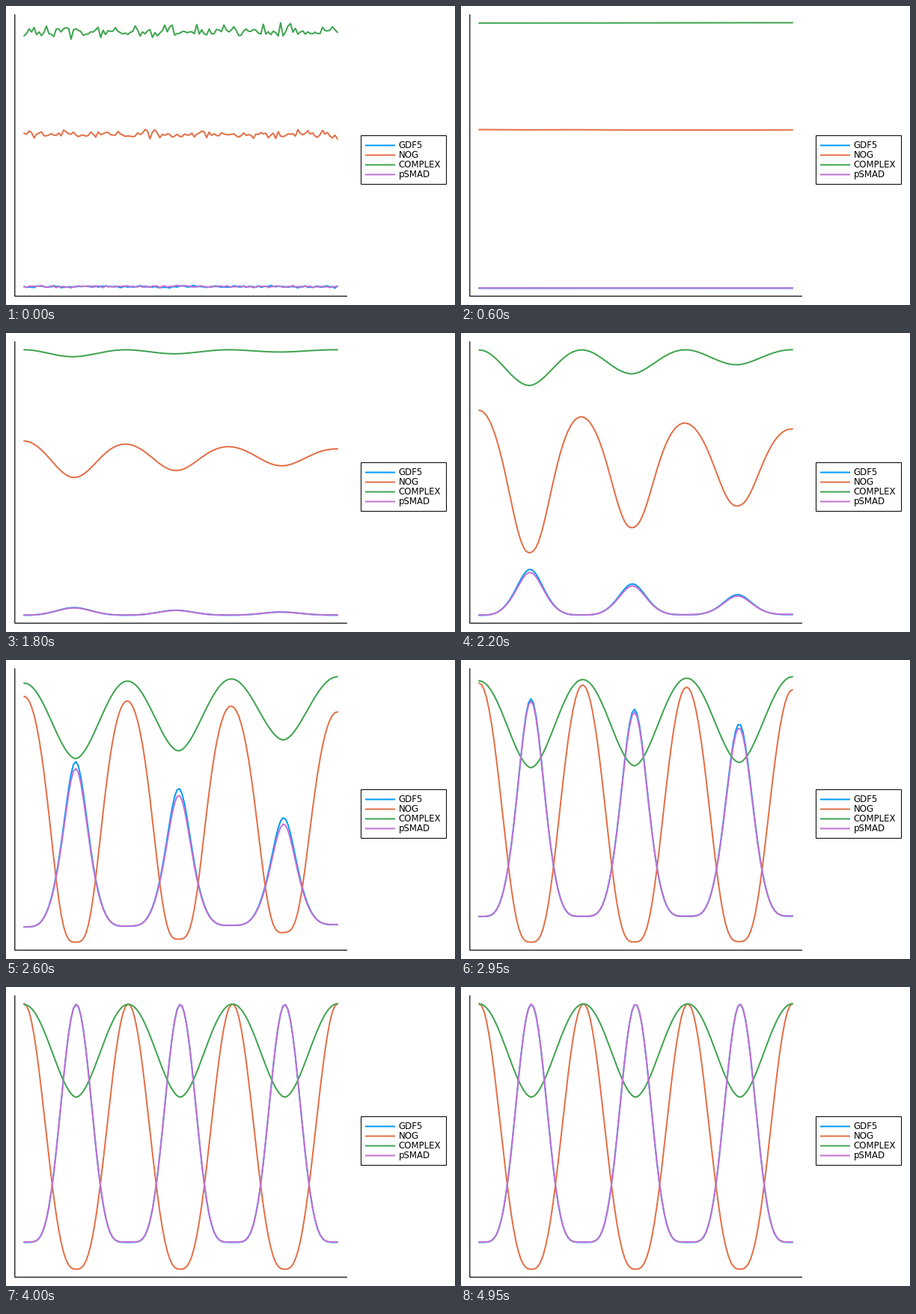
A matplotlib script for the animation above (5.05 s loop, 600 by 400 pixels).

```python
import numpy as np
import matplotlib.pyplot as plt
from matplotlib.animation import FuncAnimation
from matplotlib.patches import Rectangle

W, H, DPI = 600, 400, 100
TICK, STEP, TICKS = 50, 63.3, 101          # ms per tick, ms per solver step
LEFT, RIGHT, TOP, BOTTOM = 24.35, 442.75, 22.4, 377.5
N = 128
PX = 72 / DPI                              # points per pixel

NAMES = ["GDF5", "NOG", "COMPLEX", "pSMAD"]
COLORS = ["#009afa", "#e36f47", "#3ea44e", "#c371d2"]

# Heights of the even state and of the finished pattern
GDF_0, NOG_0, CPLX_0 = 377, 165.5, 22.5
GDF_PEAK, GDF_FLAT = 23.2, 341.5
NOG_CREST, NOG_DIP = 22.5, 377.5
CPLX_DIP = 147.5

s = np.linspace(0, 1, N)
x = LEFT + s * (RIGHT - LEFT)

# Initial noise as cosine modes, so that diffusion is a decay per mode
rng = np.random.default_rng(12)
modes = np.arange(N)
basis = np.cos(np.pi * np.outer(modes + 0.5, modes) / N)
decay = 0.1 + 0.012 * modes ** 2
noise = rng.normal(size=(4, N)) * np.array([[0.8], [2.9], [4.0], [0.8]])
coefs = noise @ basis * 2 / N
coefs[:, 0] = 0


def logistic(z):
    return 1 / (1 + np.exp(-z))


def front(k, start, spread, rate):
    """Logistic growth that sets in later towards the right."""
    return logistic(rate * (k - start - spread * s))


def landau(k, start, spread, rate):
    """Like front, but with a sharper saturation."""
    return np.sqrt(front(k, start, spread, 2 * rate))


def mix(a, b, t):
    return a + (b - a) * t


def hump(c, power, hold):
    """Shape a 0..1 cosine; hold above 1 narrows it, below 1 widens it."""
    c = c ** power
    return c / (c + hold * (1 - c))


def curves(k):
    drift = 8 * np.exp(-(k - 21) / 17) / (RIGHT - LEFT)
    phase = 6 * (s + drift * np.sin(np.pi * s ** 1.3))
    crest = (1 + np.cos(np.pi * phase)) / 2

    onset = logistic(0.3 * (k - 30))
    steep = logistic(0.5 * (k - 37))
    mature = logistic(0.7 * (k - 46))
    bend = onset * (1 - mature)

    flat = mix(GDF_0, GDF_FLAT, front(k, 39.8, -0.8, 0.5))
    peak = mix(GDF_0, GDF_PEAK, front(k, 38, 4, 0.33))
    lag = 1 - 0.07 * (1 - front(k, 41, 3, 0.4))
    spike = hump(1 - crest, 1 + onset + 0.45 * mature, 1 + 1.1 * bend)
    gdf = mix(flat, peak, spike)
    smad = mix(flat, mix(GDF_0, peak, lag), spike) - 0.2

    high = mix(NOG_0, NOG_CREST, front(k, 35, 3.1, 0.25))
    low = mix(NOG_0, NOG_DIP, landau(k, 34.3, 4.4, 0.29))
    nog = mix(low, high,
              hump(crest, 1 + 0.8 * steep - 0.4 * mature, 1 - 0.55 * bend))

    sag = 9 * (1 - s) * logistic(k - 38) * np.exp(-0.095 * (k - 41))
    low = mix(CPLX_0, CPLX_DIP, front(k, 34.6, 5.2, 0.34))
    cplx = mix(low, CPLX_0 + sag, crest ** (1 - 0.12 * onset))

    ys = np.array([gdf, nog, cplx, smad])
    ys += (coefs * np.exp(-decay * k)) @ basis.T
    # Fit the shared y range to the plot
    lo, hi = ys.min(), ys.max()
    return TOP + (ys - lo) * (BOTTOM - TOP) / (hi - lo)


fig = plt.figure(figsize=(W / DPI, H / DPI), dpi=DPI, facecolor="white")
ax = fig.add_axes([0, 0, 1, 1])
ax.set(xlim=(0, W), ylim=(H, 0))
ax.axis("off")

ax.plot([11.8, 11.8, 455.3], [11.8, 388.2, 388.2], color="black",
        lw=1.2 * PX, snap=False, solid_joinstyle="miter")

lines = [ax.plot(x, x, color=c, lw=2 * PX, solid_capstyle="projecting",
                 solid_joinstyle="round")[0] for c in COLORS]

ax.add_patch(Rectangle((474.5, 173.5), 114, 65, fc="white", ec="black",
                       lw=1 * PX, snap=False))
for i, (name, color) in enumerate(zip(NAMES, COLORS)):
    y = 186.5 + 13 * i
    ax.plot([480, 520], [y, y], color=color, lw=2 * PX, snap=False,
            solid_capstyle="butt")
    ax.text(524.4, y + 3.6, name, family="DejaVu Sans", size=11.8 * PX,
            va="baseline", ha="left", color="black")


def update(tick):
    for line, y in zip(lines, curves(int(tick * TICK / STEP))):
        line.set_ydata(y)
    return lines


anim = FuncAnimation(fig, update, frames=TICKS, interval=TICK, repeat=True,
                     repeat_delay=0)
plt.show()
```
